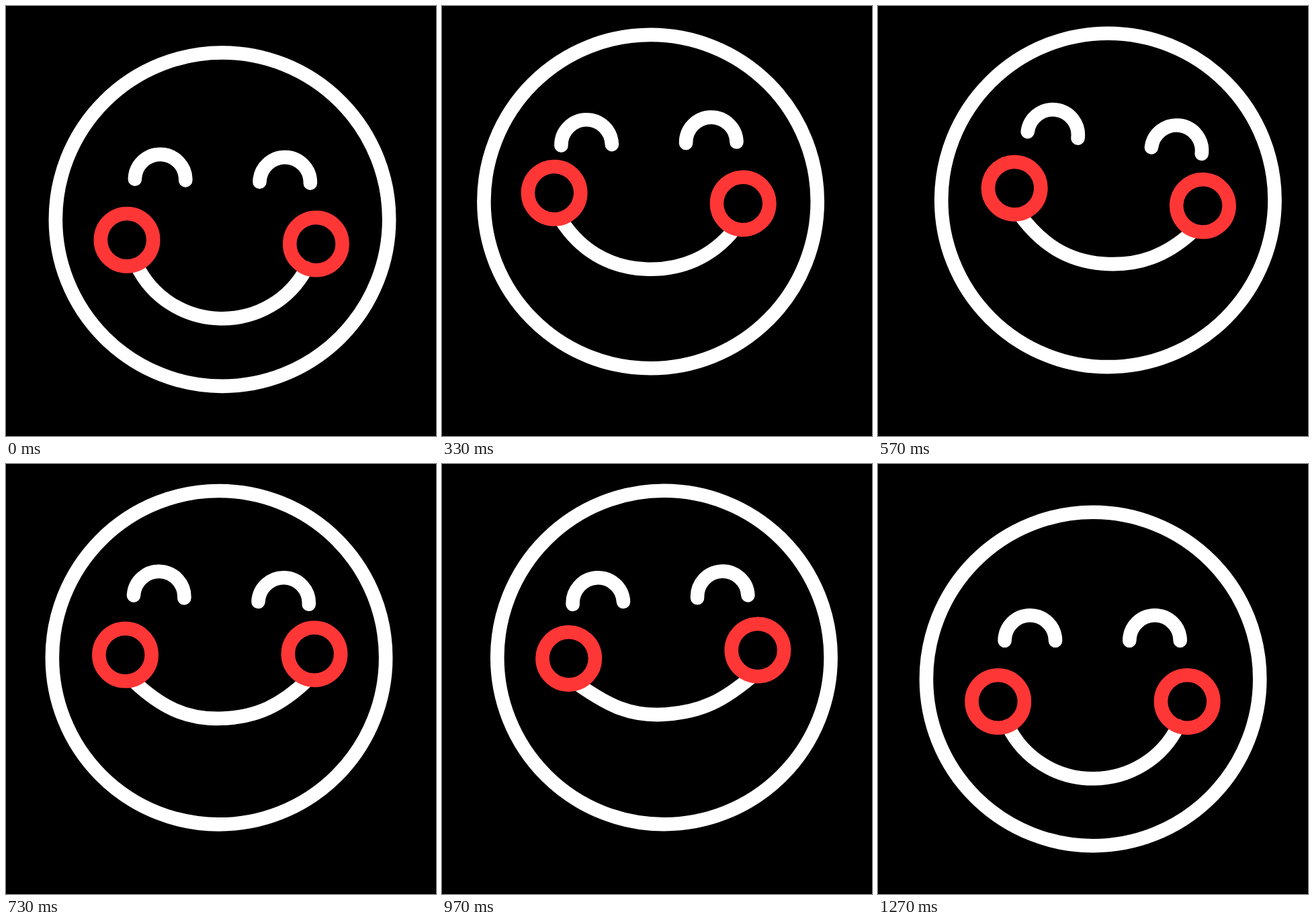
These frames come from a looping animation (640 by 640 pixels, 1670 ms). An HTML page:

```html
<!DOCTYPE html>
<html>
<head>
<meta charset="utf-8">
<style>
  html, body { margin: 0; height: 100%; overflow: hidden; background: #000; }
  svg { display: block; width: 100vw; height: 100vh; }
  svg * { fill: none; stroke-width: 20.6; stroke-linecap: round; stroke-linejoin: round; }
</style>
</head>
<body>
<svg viewBox="0 0 640 640">
  <g id="head" stroke="#fff">
    <circle r="248.2"/>
    <g id="eyes">
      <path d="M-131.5-57a37.7 37.7 0 0 1 75.4 0M54.2-57a37.7 37.7 0 0 1 75.4 0"/>
    </g>
    <g id="cheeks">
      <path id="smile"/>
      <g stroke="#ff3636">
        <circle cx="-141.4" cy="33.5" r="39.2"/>
        <circle cx="140.1" cy="33.5" r="39.2"/>
      </g>
    </g>
  </g>
</svg>
<script>
const LOOP = 1670, FPS = 30, END = 38;
const TILT = 14.4;
const $ = id => document.getElementById(id);

const progress = (step, from, to) => Math.min(1, Math.max(0, (step - from) / (to - from)));
const ease = (step, from, to) => (1 - Math.cos(Math.PI * progress(step, from, to))) / 2;

// Eased swing from one turning point to the next, back to zero at the end.
function swing(step, turns, peaks) {
  const times = [-1.4, ...turns, END];
  return [...peaks, 0].reduce((sum, peak, i) =>
    sum + (peak - (peaks[i - 1] || 0)) * ease(step, times[i], times[i + 1]), 0);
}
const tilt = (step, turns) => swing(step, turns, turns.map((_, i) => i % 2 ? -TILT : TILT));

const place = (id, x, y, angle = 0) =>
  $(id).setAttribute('transform', `rotate(${angle}) translate(${x} ${y})`);

function smilePath(up, flat) {
  const x = 126.6 + 2.5 * up, y = 70 + 2.8 * up, bottom = 148.3 - flat;
  const dx = 23.7 + .75 * flat, dy = 48.4 - .62 * flat, slant = .06 * flat;
  return `M${-x} ${y}C${dx - x} ${y + dy} -53.9 ${bottom + slant} 0 ${bottom}`
    + `S${x - dx} ${y + dy} ${x} ${y}`;
}

function draw(now) {
  const step = Math.min(END, Math.floor((now % LOOP + 3.4) * FPS / 1000));
  const stay = 1 - ease(step, 30.3, END);
  const up = ease(step, 0, 5.7) * stay;
  const drift = 1 - (1 - progress(step, 6, 26)) ** 2;
  const rise = (27.2 * ease(step, -1.4, 6) + 4.8 * drift) * stay;
  const sway = swing(step, [6, 13.2, 18.3, 24.9, 31.9], [22.4, -32, 32, -27, 32]);
  const eyeTilt = tilt(step, [5.8, 13.8, 18.6, 26.4, 32.4]);
  const cheekTilt = tilt(step, [6.1, 15.2, 18.1, 25.8, 33]);

  place('head', 320.1 + sway, 320 - rise);
  place('eyes', 0, -29 * up, eyeTilt);
  place('cheeks', .6 * (eyeTilt - cheekTilt), -38.3 * up, cheekTilt);
  $('smile').setAttribute('d', smilePath(up, (.7 + .85 * step) * stay));
}

const start = performance.now();
function tick() {
  draw(performance.now() - start);
  requestAnimationFrame(tick);
}
tick();
</script>
</body>
</html>
```
